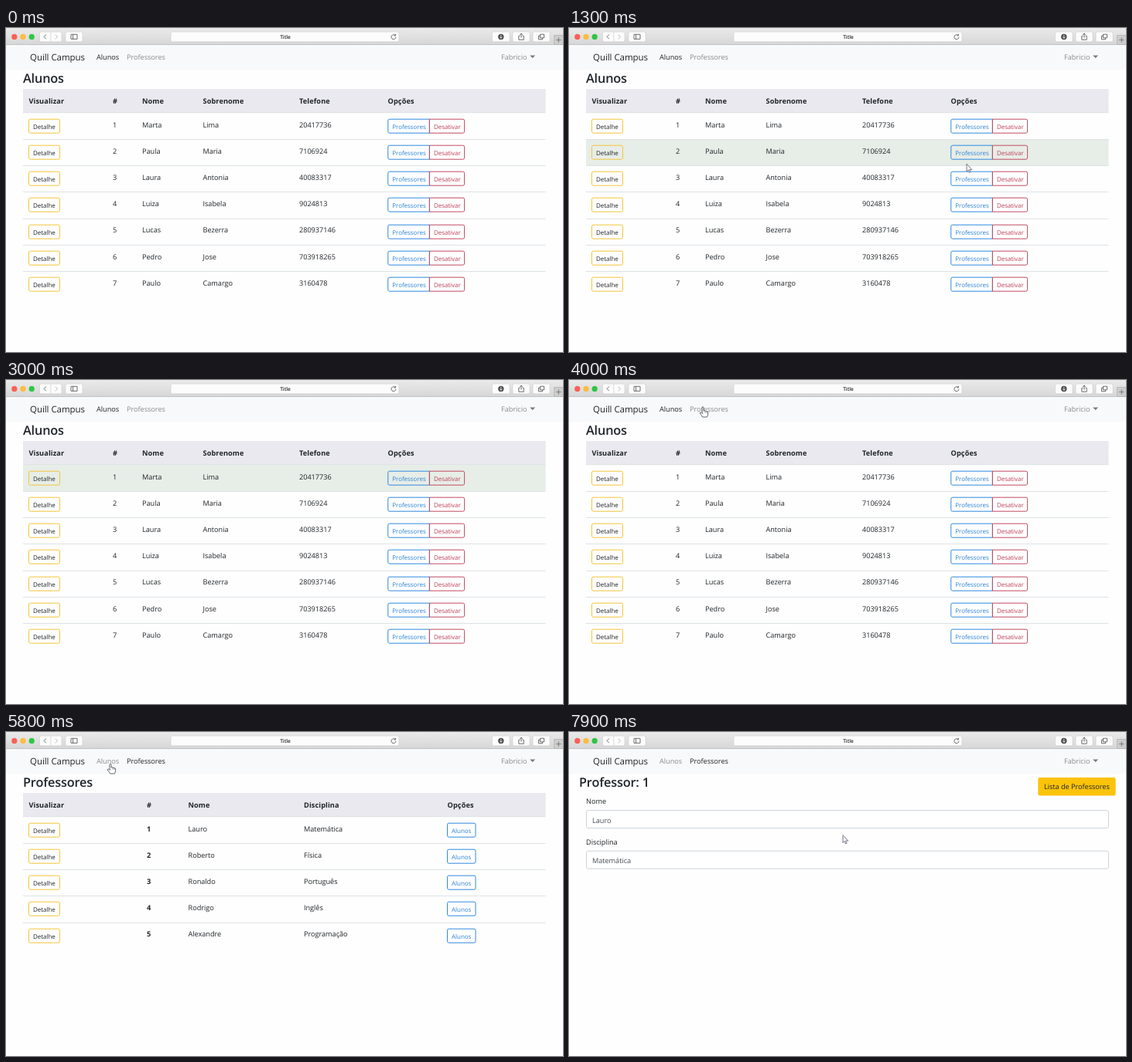
These frames come from a looping animation (720x420 px, 8000 ms). An HTML page:

```html
<!DOCTYPE html>
<html lang="pt">
<head>
<meta charset="utf-8">
<title>Title</title>
<style>
  html, body { margin: 0; width: 100%; height: 100%; overflow: hidden; background: #fefefe; }
  svg { display: block; width: 720px; height: 420px; }
  text { font: 9.2px "Open Sans", "Noto Sans", sans-serif; letter-spacing: -.005em; fill: #212529; text-rendering: geometricPrecision; white-space: pre; }
  .bold { font-weight: 700; letter-spacing: .01em; }
  .small { font-size: 8px; }
  .brand { font-size: 11.5px; }
  .heading { font-size: 16.3px; font-weight: 600; letter-spacing: -.01em; }
  .muted { fill: #8b8c8d; }
  .value { fill: #495057; }
  .title { font-size: 6.6px; font-weight: 600; text-anchor: middle; }
  .tool { fill: #fcfcfc; stroke: #cfcfcf; stroke-width: .6; }
  .icon { fill: none; stroke: #5c5c5c; stroke-width: .9; }
  .line { stroke: #dee2e6; }
  .row > .back { fill: none; }
  .row.hover > .back { fill: #e7ede7; }
  .button path { fill: none; stroke: var(--tone); }
  .button text { fill: var(--ink); }
  .button.hover path { fill: var(--tone); }
  .button.hover text { fill: var(--over); }
  .yellow { --tone: #f3c63c; --ink: #212529; --over: #212529; }
  .yellow.hover { --tone: #fdc10c; }
  .blue { --tone: #2f8ae0; --ink: #2f84d6; --over: #fff; }
  .red { --tone: #c24a60; --ink: #bf4059; --over: #fff; }
  .field { fill: #fff; stroke: #ced4da; }
  .pointer { stroke-linejoin: round; stroke-linecap: round; }
</style>
</head>
<body>
<svg id="stage" viewBox="0 0 720 420"></svg>
<script>
const LOOP = 8000, STEP = 100;
const ROW_TOP = 110, ROW_HEIGHT = 34.15;

const text = (x, y, value, cls = '') => `<text x="${x}" y="${y}" class="${cls}">${value}</text>`;
const rect = (x, y, w, h, attrs) => `<rect x="${x}" y="${y}" width="${w}" height="${h}" ${attrs}/>`;
const path = (d, attrs) => `<path d="${d}" ${attrs}/>`;

// left and right are the corner radii of each side
function button(x, y, w, label, tone, left = 2, right = 2) {
  const h = 18;
  const d = `M${x + left} ${y}h${w - left - right}q${right} 0 ${right} ${right}v${h - 2 * right}` +
    `q0 ${right} ${-right} ${right}h${left + right - w}q${-left} 0 ${-left} ${-left}v${2 * left - h}q0 ${-left} ${left} ${-left}z`;
  return `<g class="button ${tone}" data-box="${x},${y},${w},${h}">${path(d, '')}${text(x + 5.5, y + 12.5, label, 'small')}</g>`;
}

function table(title, columns, heads, records, boldId, options) {
  const head = rect(22, 79, 675.5, 31, 'fill="#e9e9ef"') +
    heads.map((h, i) => text(columns[i], 98, h, 'bold')).join('') +
    path('M22 109.7H697.5', 'class="line"');
  const rows = records.map((record, i) => {
    const top = ROW_TOP + i * ROW_HEIGHT, y = Math.round(top) + 8;
    const cells = [i + 1, ...record].map((value, k) =>
      text(columns[k + 1], top + 18.8, value, boldId && k === 0 ? 'bold' : '')).join('');
    const divider = i ? path(`M22 ${Math.round(top) + .5}H697.5`, 'class="line"') : '';
    return `<g class="row" data-box="22,${top},675.5,${ROW_HEIGHT}">` +
      rect(22, top, 675.5, ROW_HEIGHT, 'class="back"') + divider + cells +
      button(29.5, y + .2, 40, 'Detalhe', 'yellow') + options(y + .2) + '</g>';
  }).join('');
  return text(22, 71, title, 'heading') + head + rows;
}

function navLinks(active) {
  return text(117, 41, 'Alunos', active === 0 ? '' : 'muted') +
    text(156, 41, 'Professores', active === 1 ? '' : 'muted');
}

function field(label, value, y) {
  return text(22, y, label) + rect(22.5, y + 8.3, 675, 23, 'rx="2.4" class="field"') +
    text(30, y + 24.2, value, 'value');
}

const students = table('Alunos', [29.5, 138, 176, 254.5, 379, 493.5],
  ['Visualizar', '#', 'Nome', 'Sobrenome', 'Telefone', 'Opções'],
  [['Marta', 'Lima', '20417736'], ['Paula', 'Maria', '7106924'], ['Laura', 'Antonia', '40083317'],
   ['Luiza', 'Isabela', '9024813'], ['Lucas', 'Bezerra', '280937146'], ['Pedro', 'Jose', '703918265'],
   ['Paulo', 'Camargo', '3160478']],
  false,
  y => button(493.8, y, 53.6, 'Professores', 'blue', 2, 0) + button(547.4, y, 45.2, 'Desativar', 'red', 0, 2));

const teachers = table('Professores', [29.5, 182, 235.5, 385, 570.5],
  ['Visualizar', '#', 'Nome', 'Disciplina', 'Opções'],
  [['Lauro', 'Matemática'], ['Roberto', 'Física'], ['Ronaldo', 'Português'],
   ['Rodrigo', 'Inglês'], ['Alexandre', 'Programação']],
  true,
  y => button(570.5, y, 36.5, 'Alunos', 'blue'));

const detail = text(13, 71, 'Professor: 1', 'heading') +
  rect(606.3, 59, 100.3, 23.6, 'rx="2.4" fill="#fcc30b"') + text(614, 74.3, 'Lista de Professores') +
  field('Nome', 'Lauro', 93.3) + field('Disciplina', 'Matemática', 145.9);

const tool = (x, w) => rect(x, 5, w, 12.8, 'rx="2" class="tool"');
const light = (x, color) => `<circle cx="${x}" cy="11.4" r="3.6" fill="${color}"/>`;
const icon = d => path(d, 'class="icon"');

const browser =
  `<linearGradient id="bar" x2="0" y2="1"><stop stop-color="#eaeaea"/><stop offset="1" stop-color="#d6d6d6"/></linearGradient>` +
  rect(0, 0, 720, 22, 'fill="url(#bar)"') + path('M0 21.6H720', 'stroke="#bcbcbc" stroke-width=".8"') +
  light(10.8, '#fb5f58') + light(22, '#fdbd3e') + light(33.2, '#30c545') +
  tool(43.5, 28.5) + path('M57.8 5v12.8', 'stroke="#cfcfcf" stroke-width=".7"') +
  icon('M51.8 8.6l-2.8 2.8 2.8 2.8') + path('M63.7 8.6l2.8 2.8-2.8 2.8', 'fill="none" stroke="#b5b5b5" stroke-width=".9"') +
  tool(77, 22) + icon('M84 8.3h8v6h-8zM86.6 8.3v6') +
  tool(213, 295) + text(361, 14, 'Title', 'title') +
  icon('M503.2 9.6a3 3 0 1 0 .8 2.2M503.6 7.8v2h-2') +
  tool(628.5, 22.5) + '<circle cx="639.8" cy="11.4" r="3.7" fill="#4c4c4c"/>' +
  path('M639.8 9v4.3m-1.7-1.7l1.7 1.8 1.7-1.8', 'fill="none" stroke="#fff" stroke-width=".8"') +
  tool(655, 22) + icon('M664.4 10.2h-1.6v5h6.4v-5h-1.6M666 12.6V7m-1.7 1.7L666 7l1.7 1.7') +
  tool(681, 22) + icon('M690.5 8.2h5v4.6h-5zM690.3 10h-1.8v4.8h5v-1.8') +
  rect(708.4, 9.4, 12, 12, 'fill="#cdcdcd" stroke="#b4b4b4" stroke-width=".8"') +
  path('M714.3 12.3v6.4M711.1 15.5h6.4', 'stroke="#777" stroke-width=".9"');

const nav = rect(0, 22, 720, 32.3, 'fill="#f8f9fa"') + text(31, 42, 'Quill Campus', 'brand') +
  text(640, 41, 'Fabricio', 'muted') + path('M677.3 35.6h6.8l-3.4 3.5z', 'fill="#777"');

const arrow = path('M0 0V9.6L2.2 7.6 3.7 11 5.2 10.3 3.7 7.1H6.5Z',
  'id="arrow" class="pointer" fill="#f4f4f8" stroke="#6f7180" stroke-width=".9"');
const hand = `<g id="hand" class="pointer">` +
  path('M-1 1Q0-.6 1 1V5Q2.4 4.2 3 5.3 4.3 4.7 4.9 5.8 6.5 5.4 6.6 7V9.3Q6.4 11.3 5.4 13H-.4Q-1.4 10.8-3.4 8.8-4.4 7.2-3 6.9-2 7-1 8.3Z',
    'fill="#fff" stroke="#55565c" stroke-width=".9"') +
  path('M3 5.5V7.4M4.9 6V7.6', 'fill="none" stroke="#77787e" stroke-width=".7"') + '</g>';

const stage = document.getElementById('stage');
stage.innerHTML = rect(0, 0, 720, 420, 'fill="#fefefe"') + browser + nav +
  [students, teachers, detail].map((body, i) => `<g class="page">${navLinks(Math.min(i, 1))}${body}</g>`).join('') +
  `<g id="cursor">${arrow}${hand}</g>`;

const pages = [...stage.querySelectorAll('.page')].map(node => ({
  node,
  targets: [...node.querySelectorAll('[data-box]')].map(el => ({
    el, box: el.dataset.box.split(',').map(Number), clickable: el.classList.contains('button')
  }))
}));
const links = [[113, 30, 38, 18], [151, 30, 58, 18]];
const pageStarts = [0, 4300, 7200];

// time, x, y of the pointer tip
const route = [
  [200, 540, 398], [1000, 527, 214], [1300, 514, 176.5], [1900, 472, 160], [2500, 330, 130],
  [3000, 230, 125], [3400, 203, 100], [3900, 173, 35], [5300, 173, 35], [5700, 135, 41],
  [5900, 135, 41], [6400, 62, 122], [6800, 33, 133.5], [7300, 33, 133.5], [7700, 340, 132], [7900, 354, 134]
];
const overText = t => t >= 2700 && t < 3300;
const inside = (p, [x, y, w, h]) => p.x >= x && p.x < x + w && p.y >= y && p.y < y + h;

function pointerAt(t) {
  if (t < route[0][0]) return { x: -50, y: -50 };
  const next = route.findIndex(stop => stop[0] > t);
  const b = next < 0 ? route[route.length - 1] : route[next];
  const a = next < 0 ? b : route[next - 1];
  const k = a === b ? 0 : (t - a[0]) / (b[0] - a[0]);
  const ease = k * k * (3 - 2 * k);
  return { x: a[1] + (b[1] - a[1]) * ease, y: a[2] + (b[2] - a[2]) * ease };
}

const cursor = document.getElementById('cursor');
const show = (el, on) => { el.style.display = on ? '' : 'none'; };

function draw(t) {
  const current = pageStarts.filter(start => start <= t).length - 1;
  const p = pointerAt(t);
  let linked = links.some(box => inside(p, box));
  pages.forEach(({ node, targets }, i) => {
    show(node, i === current);
    if (i !== current) return;
    for (const { el, box, clickable } of targets) {
      const hit = inside(p, box);
      el.classList.toggle('hover', hit);
      linked = linked || (hit && clickable);
    }
  });
  cursor.setAttribute('transform', `translate(${p.x} ${p.y})`);
  show(cursor, !overText(t));
  show(document.getElementById('hand'), linked);
  show(document.getElementById('arrow'), !linked);
}

const began = performance.now();
function tick() {
  const t = (performance.now() - began) % LOOP;
  draw(Math.floor(t / STEP) * STEP);
  requestAnimationFrame(tick);
}
tick();
</script>
</body>
</html>
```
